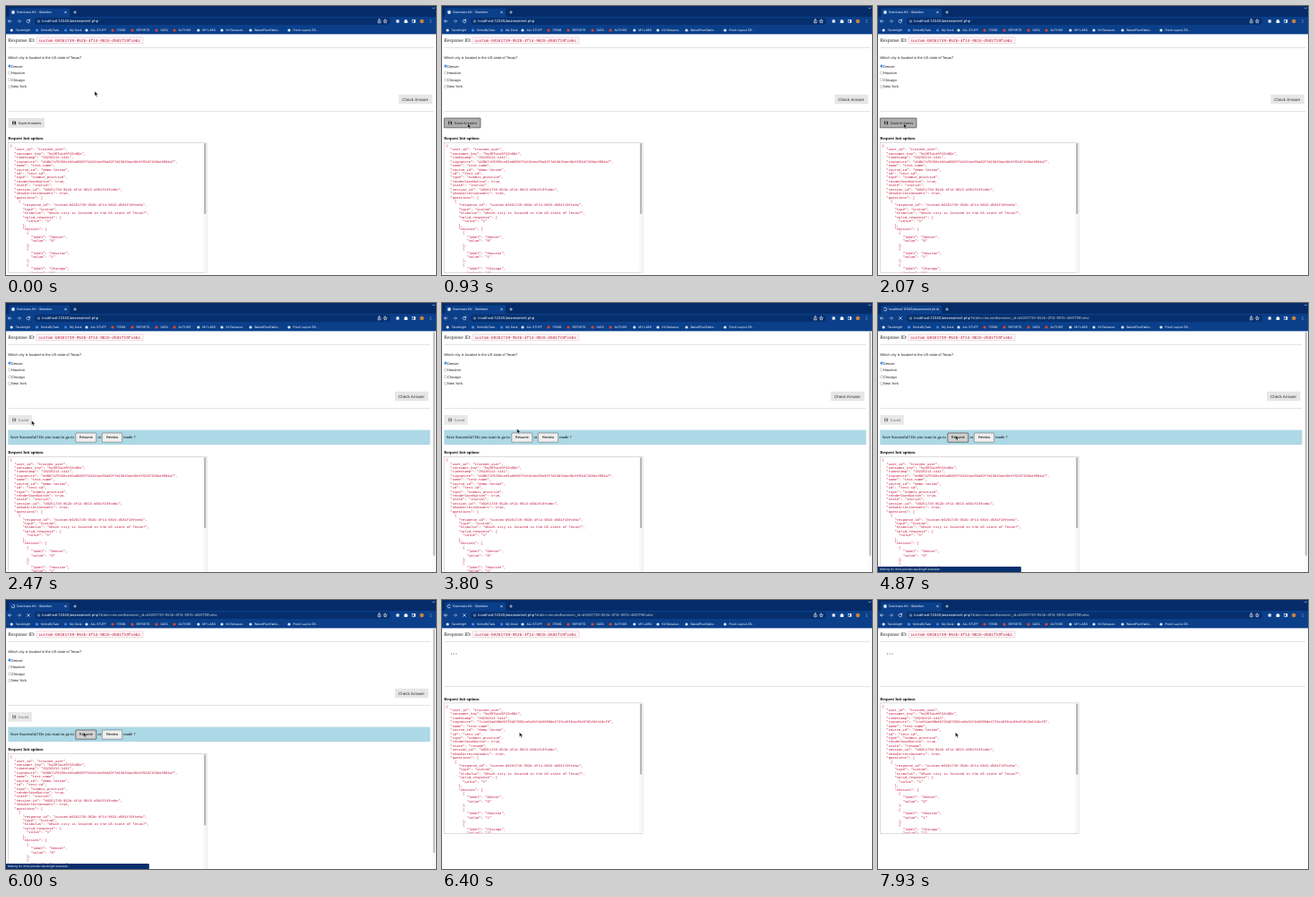
Animation, 480 px wide and 300 px high, one loop 8 s. Source, as an HTML page:

```html
<!DOCTYPE html>
<html lang="en">
<head>
<meta charset="utf-8">
<title>Skeleton page</title>
<style>
  html, body { margin: 0; width: 100%; height: 100%; overflow: hidden; background: #fff; }
  svg { display: block; width: 100vw; height: 100vh; }
  text { text-rendering: geometricPrecision; white-space: pre; }
  .ui { font-family: Inter, "Liberation Sans", sans-serif; fill: #fff; }
  .sans { font-family: "Liberation Sans", Arial, sans-serif; }
  .serif { font-family: "Liberation Serif", "Times New Roman", serif; }
  .mono { font-family: "Liberation Mono", "Courier New", monospace; fill: #c2113a; }
  .line { fill: none; stroke: #fff; stroke-width: .6; stroke-linecap: round; stroke-linejoin: round; }
</style>
</head>
<body>
<svg id="stage" viewBox="0 0 480 300" preserveAspectRatio="none"></svg>
<script>
const LOOP = 8000;
const SAVE_PRESS = 870, SAVED = 2470, RESUME_PRESS = 4530, NAVIGATE = 4600;
const RETITLE = 5730, RELOADED = 6270, LOADED = 6530, PULSE = 6670;
const ID = 'b9261739-952b-4f14-9815-d581f19fcebc';
const URL_START = 'localhost:12345/assessment.php';
const PAGE_TITLE = 'Exercises Kit - Skeleton';

const stage = document.getElementById('stage');

function add(parent, tag, attrs, content) {
  const el = document.createElementNS('http://www.w3.org/2000/svg', tag);
  for (const key in attrs) el.setAttribute(key, attrs[key]);
  if (content !== undefined) el.textContent = content;
  parent.appendChild(el);
  return el;
}
const group = (parent, attrs = {}) => add(parent, 'g', attrs);
const rect = (parent, x, y, width, height, fill, extra = {}) =>
  add(parent, 'rect', { x, y, width, height, fill, ...extra });
const circle = (parent, cx, cy, r, fill, extra = {}) =>
  add(parent, 'circle', { cx, cy, r, fill, ...extra });
const label = (parent, kind, x, y, size, content, extra = {}) =>
  add(parent, 'text', { class: kind, x, y, 'font-size': size, ...extra }, content);
const icon = (parent, d, extra = {}) => add(parent, 'path', { class: 'line', d, ...extra });
const show = (el, on) => el.setAttribute('display', on ? 'inline' : 'none');
const setText = (el, value) => { if (el.textContent !== value) el.textContent = value; };
const shift = (el, x, y) => el.setAttribute('transform', `translate(${x} ${y})`);

function paint(el, fill, stroke) {
  el.setAttribute('fill', fill);
  el.setAttribute('stroke', stroke);
}

// Page
rect(stage, 0, 0, 480, 300, '#fff');
const page = group(stage);
label(page, 'serif', 2.3, 40, 5.6, 'Response ID:', { fill: '#222' });
rect(page, 34, 34.9, 119, 6.9, '#fdf8f9', { stroke: '#dba3b2', 'stroke-width': .4, rx: .6 });
label(page, 'mono', 36.4, 39.8, 4.42, 'custom-' + ID);
const rules = [46, 117.4].map(y => rect(page, 2.3, y, 475.4, .4, '#b9b9b9'));

const quiz = group(page);
label(quiz, 'sans', 2.3, 58.7, 4.03, 'Which city is located in the US state of Texas?', { fill: '#222' });
['Denver', 'Houston', 'Chicago', 'New York'].forEach((city, i) => {
  const y = 67.1 + i * 7.6;
  circle(quiz, 4, y, 1.6, '#fff', { stroke: i ? '#767676' : '#0b6fe8', 'stroke-width': .35 });
  if (!i) circle(quiz, 4, y, 1, '#0b6fe8');
  label(quiz, 'sans', 6, y + 1.5, 4, city, { fill: '#222' });
});
const check = group(quiz);
rect(check, 438.4, 98.8, 37.4, 10.4, '#e6e6e6', { rx: .5 });
label(check, 'sans', 442.2, 105.7, 4.571, 'Check Answer', { fill: '#333' });

const save = group(quiz);
const saveBox = rect(save, 2.4, 125, 40.6, 10.8, '#e4e4e4', { 'stroke-width': .6, rx: .5 });
const disk = group(save);
add(disk, 'path', { d: 'M7.2 128.4h3l.9 .9v3h-3.9z' });
rect(disk, 8, 128.7, 1.7, 1, '#eee');
rect(disk, 8.1, 130.7, 2, 1.1, '#eee');
const saveText = label(save, 'sans', 13.8, 131.9, 4, '');

const banner = group(quiz);
rect(banner, 2.3, 141.6, 471.2, 16.5, '#add8e6');
function bannerButton(x, width, caption) {
  const box = rect(banner, x, 145, width, 10.2, '#efefef', { stroke: '#555', 'stroke-width': .5, rx: .5 });
  label(banner, 'sans', x + width / 2, 151.4, 4, caption, { 'text-anchor': 'middle' });
  return box;
}
const bannerText = (x, content) => label(banner, 'serif', x, 151.4, 4.571, content);
bannerText(4.9, 'Save Successful! Do you want to go to');
const resumeBox = bannerButton(77.8, 23, 'Resume');
bannerText(102.5, 'or');
bannerButton(107.3, 22.4, 'Review');
bannerText(131.2, 'mode ?');

const dots = [10.4, 13.2, 16].map(x => circle(page, x, 60, .65, '#888'));

// Request listing
const below = group(page);
label(below, 'serif', 2.3, 149, 4.571, 'Request Init options', { 'font-weight': 700 });
rect(below, 2.4, 152.3, 221.6, 145.4, '#fff', { stroke: '#a5a5a5', 'stroke-width': .4 });
const clip = add(add(stage, 'defs', {}), 'clipPath', { id: 'listing' });
rect(clip, 2.6, 152.5, 218, 145, '#000');
const listing = group(below, { 'clip-path': 'url(#listing)' });
rect(below, 220.4, 152.6, 3.4, 144.8, '#f7f7f7');
rect(below, 221.1, 153.1, 2.1, 79, '#b5b5b5', { rx: 1 });

function json(resumed) {
  const signature = resumed
    ? '7c1e92ad40b86f35d27093ce5a81f4b6609de2735c48fb1a93e07d52b6418cf9'
    : 'd40b71f8356ce92ad5087fb3164ec09a82f7d15b63ae40c9f82d7156be3094a7';
  return JSON.stringify({
    user_id: 'trainee_user',
    consumer_key: 'kq3RTwLe5P2Zn8Dx',
    timestamp: resumed ? '20230213-1442' : '20230213-1441',
    signature,
    name: 'test-name',
    course_id: 'demo-lesson',
    id: 'test-id',
    type: 'submit_practice',
    renderSaveButton: true,
    state: resumed ? 'resume' : 'initial',
    session_id: ID,
    showCorrectAnswers: true,
    questions: [{
      response_id: 'custom-' + ID,
      type: 'custom',
      stimulus: 'Which city is located in the US state of Texas?',
      valid_response: { value: '1' },
      choices: ['Denver', 'Houston', 'Chicago', 'New York'].map((city, i) => ({ label: city, value: String(i) }))
    }]
  }, null, 2).split('\n').slice(0, 34);
}
const listings = [false, true].map(resumed => {
  const g = group(listing);
  json(resumed).forEach((row, i) => {
    const indent = row.search(/\S/);
    label(g, 'mono', 4.8 + indent * 2.286, 157 + i * 4.43, 3.81, row.trim());
  });
  return g;
});

const pageScroll = group(page);
rect(pageScroll, 475.7, 31.5, 4.3, 268.5, '#fafafa');
rect(pageScroll, 476.8, 32.2, 2.2, 250, '#c1c1c1', { rx: 1.1 });

// Browser frame
const frame = group(stage);
rect(frame, 0, 0, 480, 31.4, '#0b3f8a');
rect(frame, 0, 0, 480, 12, '#052c68');
add(frame, 'path', { d: 'M2 12q1.4 0 1.4-1.6V4.2q0-1.7 1.7-1.7h64.5q1.7 0 1.7 1.7v6.2q0 1.6 1.4 1.6z', fill: '#0b3f8a' });
const globe = group(frame);
circle(globe, 8, 7, 1.9, '#dbe6f7');
const spinner = icon(frame, 'M8 5.2a1.8 1.8 0 1 1-1.8 1.8', { stroke: '#9cc4ff' });
const title = label(frame, 'ui', 12.2, 8.3, 3.5, '');
icon(frame, 'M65.6 6.1l1.8 1.8m0-1.8l-1.8 1.8M75.6 7h2.8m-1.4-1.4v2.8M476.4 2l1 1 1-1');
icon(frame, 'M6 17H2.6m1.5-1.5L2.6 17l1.5 1.5');
icon(frame, 'M13 17h3.4m-1.5-1.5l1.5 1.5-1.5 1.5', { opacity: .7 });
const reload = icon(frame, 'M26.4 15.9a1.8 1.8 0 1 0 .3 1.6M26.7 14.9v1.4h-1.4');
const stop = icon(frame, 'M23.6 15.6l2.8 2.8m0-2.8l-2.8 2.8');
rect(frame, 32, 13.2, 397, 7.7, '#062f6d', { rx: 3.8 });
circle(frame, 36.5, 17, 1.3, 'none', { stroke: '#fff', 'stroke-width': .4 });
rect(frame, 36.3, 16.7, .4, 1, '#fff');
const address = label(frame, 'ui', 40.3, 18.4, 4.05, '');
const rest = add(address, 'tspan', { 'fill-opacity': .75 });
const host = document.createTextNode(URL_START);
address.insertBefore(host, rest);

icon(frame, 'M415.3 16.7v2.1h2.8v-2.1m-1.4 .8v-2.8m-.9 .8l.9-.9 .9 .9', { 'stroke-width': .45 });
icon(frame, 'M423.3 15l.6 1.3 1.4.2-1 1 .2 1.4-1.2-.7-1.2.7.2-1.4-1-1 1.4-.2z', { 'stroke-width': .45 });
rect(frame, 435.6, 15.4, 3.2, 3.2, '#e9eef8');
add(frame, 'path', { d: 'M444.6 15.8h1.1a.7.7 0 0 1 1.4 0h1v1.1a.7.7 0 0 1 0 1.3v.9h-3.5z', fill: '#fff' });
rect(frame, 453.5, 15.5, 3.4, 3, 'none', { stroke: '#fff', 'stroke-width': .5 });
rect(frame, 455.3, 15.5, 1.6, 3, '#fff');
circle(frame, 464.2, 17, 2.3, '#c9823f');
[15.6, 17, 18.4].forEach(y => circle(frame, 474, y, .45, '#fff'));

const bookmarks = [
  [6.2, 'Tavobright', '#e8eefb'], [34.6, 'NotesByTask', '#4c8df0'], [66.6, 'My Desk', '#3b82f0'],
  [90, 'ALL STUFF', '#dfe7f5'], [119, 'ITEMS', '#e0452f'], [141, 'REPORTS', '#e0452f'],
  [168, 'DATA', '#e0452f'], [188, 'AUTHOR', '#e0452f'], [214.8, 'MY LABS', '#dfe7f5'],
  [241, 'Kit Releases', '#dfe7f5'], [273, 'BakedPlumTable...', '#dfe7f5'], [316, 'Fresh Layout ZB...', '#dfe7f5']
];
bookmarks.forEach(([x, name, color]) => {
  circle(frame, x, 27, 1.6, color);
  label(frame, 'ui', x + 4.4, 28.2, 3.3, name);
});

const status = group(stage);
add(status, 'path', { d: 'M0 294h158.6q1.2 0 1.2 1.2V300H0z', fill: '#062f6d' });
label(status, 'ui', 1.8, 298.2, 3.2, 'Waiting for drills.preview.tavobright.example...');

const pointer = add(stage, 'path', {
  d: 'M0 0v5.3l1.25-1.15.85 2 .95-.4-.85-1.95h1.7z',
  fill: '#111', stroke: '#fff', 'stroke-width': .4
});

// Motion: start, end, target x, target y
const moves = [[70, 730, 28.6, 131], [2870, 3670, 83.6, 140], [3730, 4530, 86.4, 147.4]];
const ease = p => p * p * (3 - 2 * p);
function pointerAt(t) {
  let x = 99, y = 95;
  for (const [from, to, tx, ty] of moves) {
    const p = ease(Math.min(1, Math.max(0, (t - from) / (to - from))));
    x += (tx - x) * p;
    y += (ty - y) * p;
  }
  return [x, y];
}

function render(t) {
  const fresh = t >= RELOADED;
  const saved = t >= SAVED && !fresh;
  const loading = t >= NAVIGATE && t < LOADED;
  const [px, py] = pointerAt(t);

  show(quiz, !fresh);
  show(banner, saved);
  show(pageScroll, saved);
  shift(check, saved ? -4.3 : 0, 0);
  shift(below, 0, fresh ? -37.4 : saved ? 19.2 : 0);
  listings.forEach((g, i) => show(g, fresh === !!i));
  rules.forEach(r => r.setAttribute('width', saved ? 471.2 : 475.4));
  rules[1].setAttribute('y', fresh ? 96.4 : 117.4);

  const hover = px < 43 && py > 125;
  const ink = saved ? '#777' : '#222';
  saveBox.setAttribute('width', saved ? 26.4 : 40.6);
  if (saved) paint(saveBox, '#e8e8e8', 'none');
  else if (t >= SAVE_PRESS) paint(saveBox, '#adadad', '#333');
  else paint(saveBox, hover ? '#d2d2d2' : '#e4e4e4', 'none');
  setText(saveText, saved ? 'Saved' : 'Save Answers');
  saveText.setAttribute('fill', ink);
  disk.setAttribute('fill', ink);
  if (t >= RESUME_PRESS) paint(resumeBox, '#d0d0d0', '#111');
  else paint(resumeBox, '#efefef', '#555');

  dots.forEach((dot, i) => {
    show(dot, fresh);
    const p = ((t - PULSE + LOOP) % 730 - i * 90) / 220;
    const lift = p > 0 && p < 1 ? Math.sin(p * Math.PI) : 0;
    dot.setAttribute('opacity', 1 - .7 * lift);
  });

  setText(title, t >= NAVIGATE && t < RETITLE ? 'localhost:12345/assessment.ph' : PAGE_TITLE);
  setText(rest, t >= NAVIGATE ? '?state=resume&session_id=' + ID : '');
  show(globe, !loading);
  show(spinner, loading);
  spinner.setAttribute('transform', `rotate(${t * .36 % 360} 8 7)`);
  show(reload, !loading);
  show(stop, loading);
  show(status, loading && !fresh);
  shift(pointer, px, py);
}

const start = performance.now();
function tick() {
  render((performance.now() - start) % LOOP);
  requestAnimationFrame(tick);
}
tick();
</script>
</body>
</html>
```
